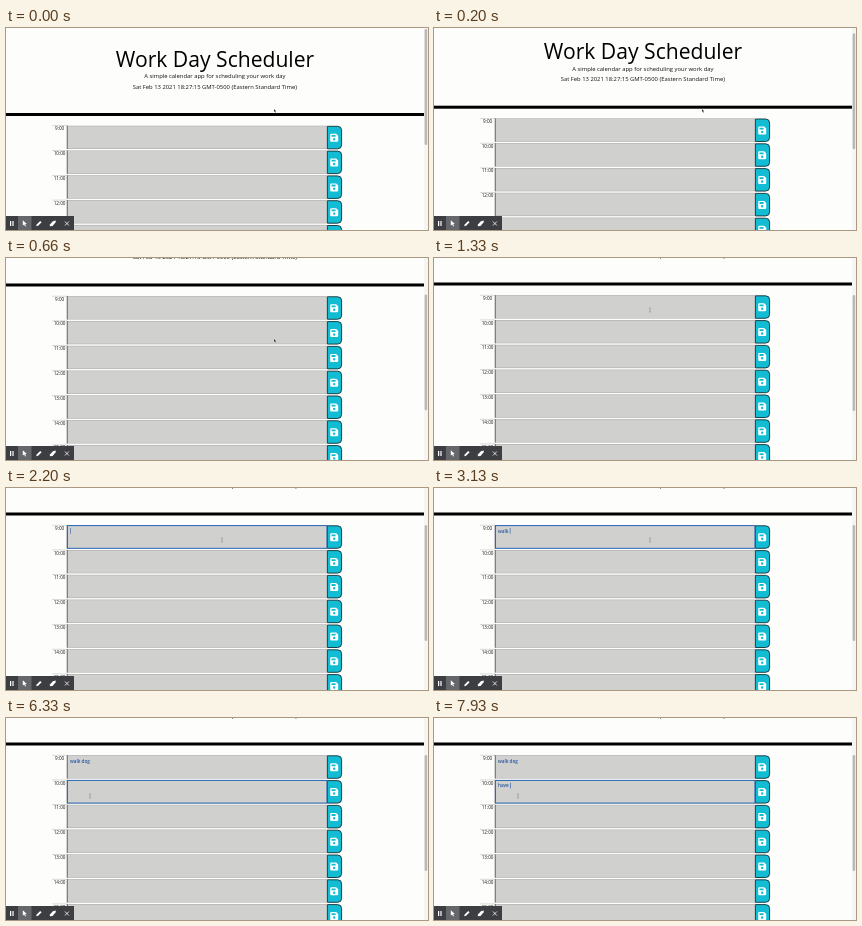
Animation of 422 by 202 pixels, one loop 8000 ms. Source, as an HTML page with a canvas:

```html
<!DOCTYPE html>
<html lang="en">
<head>
<meta charset="utf-8">
<title>Work Day Scheduler</title>
<style>
  html, body { margin: 0; width: 100%; height: 100%; overflow: hidden; background: #fdfdfb; }
  canvas { display: block; }
</style>
</head>
<body>
<canvas id="stage" width="422" height="202"></canvas>
<script>
const ctx = document.getElementById('stage').getContext('2d');
const LOOP = 8000;
const ROW_TOP = 98, ROW_STEP = 24.8, ROW_HEIGHT = 23;
const SCROLL_END = 60.5;

// Each entry: when the field gains and loses focus, and when its keys are hit.
const entries = [
  { text: 'walk dog', focus: 1750, blur: 4550, keys: [2400, 2550, 2700, 2850, 3000, 3300, 3470, 3640] },
  { text: 'have ', focus: 5800, blur: LOOP, keys: [7130, 7300, 7460, 7630, 7800] }
];

// Pointer stops: [time, x, y]
const pointerPath = [
  [0, 268, 81], [880, 268, 81], [1200, 216, 52], [3900, 216, 52],
  [4400, 328, 50], [5100, 328, 50], [5650, 84, 78], [LOOP, 84, 78]
];

function ease(t, from, to) {
  const p = Math.min(1, Math.max(0, (t - from) / (to - from)));
  return p * p * (3 - 2 * p);
}

function rect(x, y, w, h, color) {
  ctx.fillStyle = color;
  ctx.fillRect(x, y, w, h);
}

function text(str, x, y, size, color = '#111', align = 'center', weight = 400) {
  ctx.font = `${weight} ${size}px "Open Sans", sans-serif`;
  ctx.textAlign = align;
  ctx.fillStyle = color;
  ctx.fillText(str, x, y);
}

function shape(path, x, y, fill, stroke, width = 0.6) {
  ctx.save();
  ctx.translate(x, y);
  const p = new Path2D(path);
  if (fill) { ctx.fillStyle = fill; ctx.fill(p, 'evenodd'); }
  if (stroke) { ctx.strokeStyle = stroke; ctx.lineWidth = width; ctx.stroke(p); }
  ctx.restore();
}

function drawHeader(scroll) {
  text('Work Day Scheduler', 209, 38.5 - scroll, 21.1, '#000');
  text('A simple calendar app for scheduling your work day', 208.8, 50 - scroll, 5.87);
  text('Sat Feb 13 2021 18:27:15 GMT-0500 (Eastern Standard Time)', 208.8, 60.8 - scroll, 5.87);
  rect(0, 85 - scroll, 418, 3, '#000');
}

function drawSaveButton(y, hover) {
  ctx.beginPath();
  ctx.roundRect(321.4, y + 0.3, 14.2, ROW_HEIGHT - 0.5, [0, 4, 4, 0]);
  ctx.fillStyle = hover ? '#1ca5d6' : '#12bcd3';
  ctx.fill();
  ctx.strokeStyle = '#123038';
  ctx.lineWidth = 0.9;
  ctx.stroke();
  // Floppy disk with its shutter and hub cut out
  shape('M1 0H6L8 2V7Q8 8 7 8H1Q0 8 0 7V1Q0 0 1 0ZM1.3 1.2V3H5.4V1.2ZM4 4.2A1.2 1.2 0 1 0 4 6.6A1.2 1.2 0 1 0 4 4.2Z',
    324.2, y + 7.8, '#fff');
}

function drawEntry(entry, y, t) {
  const typed = entry.keys.filter(k => k <= t);
  const value = entry.text.slice(0, typed.length);
  text(value, 64, y + 7, 4.6, '#2456a0', 'left', 600);
  if (t < entry.focus || t >= entry.blur) return;
  ctx.strokeStyle = '#2b66b4';
  ctx.lineWidth = 1;
  ctx.strokeRect(61.4, y + 0.1, 259.6, ROW_HEIGHT - 0.3);
  const lastInput = typed.length ? typed[typed.length - 1] : entry.focus;
  if (Math.floor((t - lastInput) / 500) % 2 === 0) {
    rect(64.3 + ctx.measureText(value).width, y + 2.6, 0.6, 5.6, '#2456a0');
  }
}

function drawRows(scroll, t) {
  for (let i = 0; i < 7; i++) {
    const y = ROW_TOP + i * ROW_STEP - scroll;
    rect(46, y - 0.6, 15, 0.5, '#b5b5b5');
    text(`${9 + i}:00`, 53.6, y + 4.2, 4.6);
    rect(61, y - 0.3, 260, ROW_HEIGHT + 0.3, '#a8a8a8');
    rect(61, y + 0.2, 260, ROW_HEIGHT - 0.7, '#d0d0cf');
    rect(60.8, y - 0.3, 0.7, ROW_HEIGHT + 0.3, '#333');
    drawSaveButton(y, i === 0 && t > 4350 && t < 5150);
    if (entries[i]) drawEntry(entries[i], y, t);
  }
}

function drawScrollbar(scroll) {
  rect(418, 0, 4, 202, '#f5f5f4');
  ctx.beginPath();
  ctx.roundRect(418.6, 1 + scroll * 0.595, 2.6, 116, 1.3);
  ctx.fillStyle = '#b9b9b9';
  ctx.fill();
}

function drawToolbar() {
  rect(0, 188, 68, 14, '#3d3e42');
  rect(12, 188, 13.5, 14, '#66676a');
  rect(4, 193, 1.2, 5, '#fff');
  rect(6.4, 193, 1.2, 5, '#fff');
  shape('M0 0L4 3.7L2.3 3.9L3.2 5.8L2.3 6.2L1.4 4.3L0 5.3Z', 16.8, 192.3, '#fff');
  shape('M0 5.6L.5 3.8L4 .3L5.4 1.7L1.9 5.2Z', 30.2, 192.6, '#fff');
  shape('M0 4L3 .8L6 0L5.6 2L2.6 5.4L0 5.8Z', 43.9, 192.5, '#fff');
  shape('M0 0L4 4M4 0L0 4', 58.9, 193.5, null, '#fff', 0.8);
}

function drawPointer(t) {
  const i = Math.max(1, pointerPath.findIndex(stop => stop[0] > t));
  const [t0, x0, y0] = pointerPath[i - 1], [t1, x1, y1] = pointerPath[i];
  const p = ease(t, t0, t1);
  const x = x0 + (x1 - x0) * p, y = y0 + (y1 - y0) * p;
  if (t < 900) {
    shape('M0 0L2.2 2.2L1.3 2.3L1.8 3.5L1.2 3.7L.7 2.5L0 3.1Z', x, y, '#111', '#fff', 0.2);
  } else if (x > 321) {
    shape('M0 0Q.6-.6 1 0V1.8L3 2.3V4L2.4 5H.5L-1 3.1L-.6 2.7L0 3.2Z', x, y, '#fff', '#222', 0.4);
  } else {
    shape('M-.7-2H.7M0-2V2M-.7 2H.7', x, y - 6 + 6, null, '#777', 0.5);
  }
}

function draw(t) {
  const scroll = SCROLL_END * ease(t, 60, 710);
  rect(0, 0, 422, 202, '#fdfdfb');
  drawHeader(scroll);
  drawRows(scroll, t);
  drawScrollbar(scroll);
  drawPointer(t);
  drawToolbar();
}

const start = performance.now();
function tick() {
  draw((performance.now() - start) % LOOP);
  requestAnimationFrame(tick);
}
tick();
</script>
</body>
</html>
```
